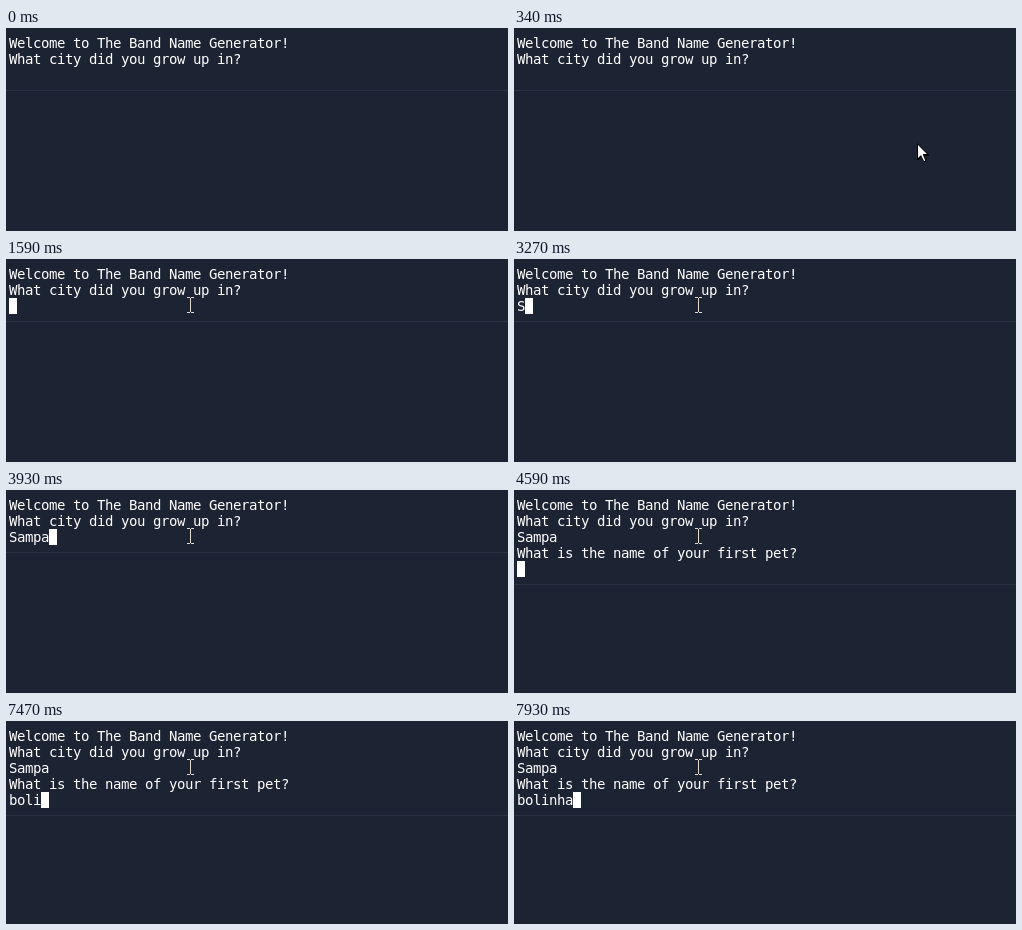
Animation of 502x203 px, one loop 8 s. Source, as an HTML page:

```html
<!DOCTYPE html>
<html lang="en">
<head>
<meta charset="utf-8">
<title>Band name console</title>
<style>
  html, body { margin: 0; width: 100%; height: 100%; overflow: hidden; background: #1c2333; }
  svg { display: block; width: 502px; height: 203px; }
  text { font: 14px "DejaVu Sans Mono", monospace; fill: #fff; white-space: pre; }
  #beam { fill: #fff; mix-blend-mode: difference; }
</style>
</head>
<body>
<svg viewBox="0 0 502 203" xmlns="http://www.w3.org/2000/svg">
  <rect width="502" height="203" fill="#1c2333"/>
  <rect id="rule" width="502" height="1" fill="#2b3245" shape-rendering="crispEdges"/>
  <g id="lines"></g>
  <rect id="caret" width="8" height="16" fill="#fff" shape-rendering="crispEdges"/>
  <path id="beam" shape-rendering="crispEdges" d="M-3-8h3v1h-3zM1-8h3v1h-3zM0-7h1v14h-1zM-3 7h3v1h-3zM1 7h3v1h-3z"/>
  <g id="arrow">
    <path d="M0 0V17H1L4 14L7 19H9V17L7 13H12V12Z" fill="#000"/>
    <path d="M1 2V15L4 12L7 18H8V17L6 12V11H10Z" fill="#fff"/>
  </g>
</svg>
<script>
const LOOP = 8000, LEFT = 3, TOP = 7, CELL = 8, ROW = 16;
const CARET_ON = 1590, ENTER = 4590;
const city = { word: 'Sampa', keys: [3270, 3540, 3600, 3800, 3930] };
const pet = { word: 'bolinha', keys: [6610, 6810, 7270, 7470, 7600, 7800, 7930] };

const $ = id => document.getElementById(id);
const place = (el, x, y) => el.setAttribute('transform', `translate(${x} ${y})`);
const show = (el, on) => el.setAttribute('visibility', on ? 'visible' : 'hidden');
const mix = (a, b, k) => Math.round(a + (b - a) * k);

const rows = Array.from({ length: 5 }, (_, i) => {
  const el = document.createElementNS('http://www.w3.org/2000/svg', 'text');
  el.setAttribute('y', TOP + i * ROW + 13);
  $('lines').append(el);
  return el;
});

// Each character sits on the terminal grid.
function write(row, str) {
  const el = rows[row];
  if (el.textContent === str) return;
  el.textContent = str;
  el.setAttribute('x', [...str].map((_, i) => LEFT + i * CELL).join(' '));
}

const typed = ({ word, keys }, t) => word.slice(0, keys.filter(k => k <= t).length);

// Pointer samples: rise to the top edge, turn back, settle on the prompt.
const ticks = [130, 200, 270, 340, 410, 480, 550, 620, 700, 770, 830, 900,
               1040, 1110, 1180, 1250, 1320, 1390];

function pointer(t) {
  const n = ticks.filter(k => k <= t).length - 1;
  if (n < 0) return null;
  if (n <= 8) {
    const k = n / 8;
    return [mix(433, 352, k), mix(190, -10, k)];
  }
  if (n <= 11) {
    const k = (n - 8) / 3;
    return [mix(352, 287, k), mix(-10, 34, k)];
  }
  const k = 1 - (1 - (n - 11) / 6) ** 2;
  return [mix(287, 184, k), mix(34, 46, k)];
}

function draw(t) {
  const second = t >= ENTER;
  const a = typed(city, t), b = typed(pet, t);
  write(0, 'Welcome to The Band Name Generator!');
  write(1, 'What city did you grow up in?');
  write(2, a);
  write(3, second ? 'What is the name of your first pet?' : '');
  write(4, b);

  const row = second ? 4 : 2;
  place($('caret'), LEFT + (second ? b : a).length * CELL, TOP + row * ROW);
  show($('caret'), t >= CARET_ON);
  place($('rule'), 0, second ? 94 : 62);

  const p = pointer(t);
  const overText = p && p[1] >= 0 && p[1] < 62;
  show($('beam'), overText);
  show($('arrow'), p && !overText);
  if (p) place(overText ? $('beam') : $('arrow'), ...p);
}

const start = performance.now();
function frame(now) {
  draw(Math.max(0, now - start) % LOOP);
  requestAnimationFrame(frame);
}
draw(0);
requestAnimationFrame(frame);
</script>
</body>
</html>
```
